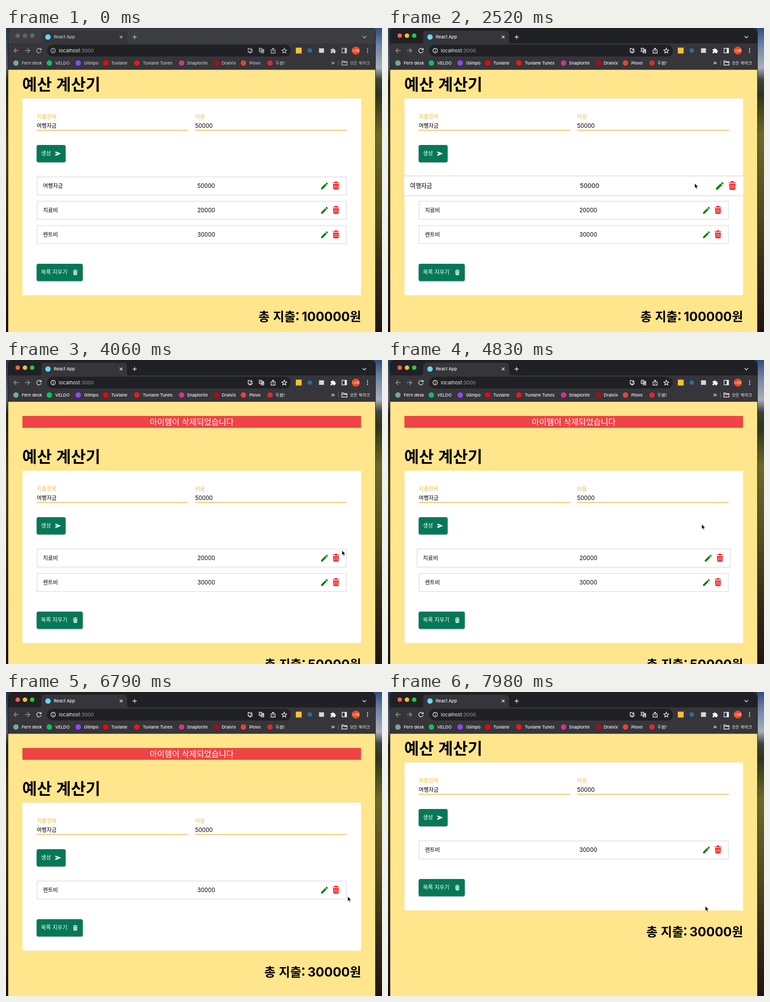
An HTML page for the animation above (8 s loop, 833 px wide and 673 px high).

```html
<!DOCTYPE html>
<html lang="ko">
<head>
<meta charset="utf-8">
<title>예산 계산기</title>
<style>
  html, body { margin: 0; width: 100%; height: 100%; overflow: hidden; }
  svg { display: block; width: 833px; height: 673px; }
  text { font: 12.5px Inter, "Noto Sans CJK KR", sans-serif; }
  .ko { font-family: "Noto Sans CJK KR", sans-serif; font-size: 12px; }
  .title { font-size: 35.5px; font-weight: 700; }
  .notice { font-size: 17.9px; fill: #fff; text-anchor: middle; }
  .total { font-size: 27px; font-weight: 700; text-anchor: end; }
  .total .sum { font: 700 28px Inter, sans-serif; }
  .label { fill: #efbf4d; }
  .on-green { fill: #fff; }
  .small { font-size: 9.5px; font-weight: 500; fill: currentColor; }
  .icon { fill: none; stroke: currentColor; stroke-width: 1.3; }
  #browser { --frame: #202124; color: #f4f4f6; }
  #browser.inactive { --frame: #3c3e42; color: #c3c5c9; }
  .inactive .light { fill: #636569; }
  .button { fill: #047857; filter: drop-shadow(0 1px 1px #0007); }
</style>
</head>
<body>
<svg viewBox="0 0 833 673">
  <defs>
    <linearGradient id="leftView" x2="0" y2="1">
      <stop offset="0" stop-color="#263955"/><stop offset=".13" stop-color="#59636c"/>
      <stop offset=".18" stop-color="#1c2413"/><stop offset=".4" stop-color="#4b4318"/>
      <stop offset=".7" stop-color="#302812"/><stop offset="1" stop-color="#17110b"/>
    </linearGradient>
    <linearGradient id="rightView" x2="0" y2="1">
      <stop offset="0" stop-color="#304d7c"/><stop offset=".06" stop-color="#7186a5"/>
      <stop offset=".13" stop-color="#a9b0b8"/><stop offset=".17" stop-color="#39443b"/>
      <stop offset=".22" stop-color="#2c341a"/><stop offset=".35" stop-color="#6c682a"/>
      <stop offset=".6" stop-color="#514b1d"/><stop offset=".8" stop-color="#332b14"/>
      <stop offset="1" stop-color="#1e160e"/>
    </linearGradient>
    <path id="pencil" transform="translate(695.5 339.5) scale(.84)" d="M3 17.25V21h3.75L17.81 9.94l-3.75-3.75zM20.71 7.04c.39-.39.39-1.02 0-1.41l-2.34-2.34c-.39-.39-1.02-.39-1.41 0l-1.83 1.83 3.75 3.75z"/>
    <g id="bin">
      <path d="M0 2.6Q0 2 .6 2H4.6L5.5.4Q5.8 0 6.3 0H9.7Q10.2 0 10.5.4L11.4 2H15.4Q16 2 16 2.6V4.2H0ZM1.3 5H14.7L14 16.8Q13.9 18.4 12.4 18.4H3.6Q2.1 18.4 2 16.8Z"/>
      <path class="slots" d="M4.9 7V16M8 7V16M11.1 7V16" stroke-width="1.1"/>
    </g>
  </defs>

  <rect width="420" height="673" fill="url(#leftView)"/>
  <rect x="420" width="413" height="673" fill="url(#rightView)"/>
  <rect x="5" y="60" width="813" height="613" fill="#ffe58b"/>

  <g id="page">
    <g id="notice">
      <rect x="37" y="124.5" width="749" height="25" fill="#f04346" stroke="#dd3c3d"/>
      <text class="ko notice" x="411.5" y="143.5">아이템이 삭제되었습니다</text>
    </g>
    <g id="content">
      <text class="ko title" x="36" y="138">예산 계산기</text>
      <rect id="card" x="36.5" y="156" width="750" fill="#fff"/>
      <text class="ko label" x="68" y="201">지출항목</text>
      <text class="ko" x="68" y="220.5">여행자금</text>
      <text class="ko label" x="419" y="201">비용</text>
      <text x="419" y="220.8">50000</text>
      <path d="M68 226.4H404M419 226.4H755" stroke="#edbd50" stroke-width="1.6"/>
      <rect class="button" x="68" y="259" width="64" height="38" rx="4"/>
      <text class="ko on-green" x="77.5" y="282">생성</text>
      <path d="M109.5 273 122 278 109.5 283.2V279.2L116 278 109.5 276.8Z" fill="#fff"/>
      <g id="rows"></g>
      <g id="footer">
        <rect class="button" x="68" y="522" width="102" height="38" rx="4"/>
        <text class="ko on-green" x="77.5" y="545">목록 지우기</text>
        <use href="#bin" transform="translate(148 534.5) scale(.69)" fill="#fff" stroke="#047857"/>
        <text class="ko total" x="786.5" y="649">총 지출:<tspan class="sum" dx="5" id="sum"></tspan>원</text>
      </g>
    </g>
  </g>

  <g id="browser">
    <path d="M5 40V10Q5 1 14 1H809Q818 1 818 10V40Z" fill="var(--frame)"/>
    <path d="M5 34H72Q78 34 78 28V14Q78 6 86 6H260Q268 6 268 14V28Q268 34 274 34H818V92.5H5Z" fill="#36353a"/>
    <path d="M4.5 673V10Q4.5 .5 14 .5H809Q818.5 .5 818.5 10V673" fill="none" stroke="#1b1b1d"/>
    <circle class="light" cx="26" cy="17" r="5" fill="#ff5f57"/>
    <circle class="light" cx="42" cy="17" r="5" fill="#febc2e"/>
    <circle class="light" cx="58" cy="17" r="5" fill="#28c840"/>
    <circle cx="93" cy="20" r="6" fill="#61dafb"/>
    <text class="small" x="106" y="23.4">React App</text>
    <path class="icon" d="M252 17l6 6m0-6-6 6M280.5 20h9m-4.5-4.5v9M790 18l4 4 4-4"/>
    <rect x="91" y="37" width="540" height="26" rx="13" fill="#202124"/>
    <g class="icon">
      <path d="M28 50H17.5m5-5-5 5 5 5M42 50H52.5m-5-5 5 5-5 5" stroke="#9a9ba0"/>
      <path d="M77 47A5 5 0 1 0 78 51M78 44.5v3.8h-3.8"/>
      <circle cx="104.5" cy="50" r="5"/>
      <path d="M104.5 49.3v3.4M104.5 46.8v1.3"/>
      <path d="M541 45.5h-4.5v7.5h9v-3M538.5 55h5M543.5 44v5.5m-2.5-2.5 2.5 2.5 2.5-2.5"/>
      <path d="M561 45h5.5v7H561ZM567.5 47.5H571V55h-5.5l-1-2M562.5 48.5h2.5M567 53l1.7-4 1.7 4"/>
      <path d="M589.5 48.5h-2.3v7h9v-7H594M591.7 52.5V44.5m-2.5 2.5 2.5-2.5 2.5 2.5"/>
      <path d="M616.5 44.6 618 48.4l4 .3-3.1 2.6 1 4-3.4-2.2-3.4 2.2 1-4-3.1-2.6 4-.3Z"/>
      <path d="M744.5 45h10v10h-10Z"/>
    </g>
    <text x="117" y="53.7" fill="#f1f1f3" font-size="11" style="font-size:11px">localhost<tspan fill="#9a9ba0">:3000</tspan></text>
    <rect x="642" y="43.5" width="13" height="13" fill="#fbc02d"/>
    <circle cx="673" cy="50" r="5" fill="#2d6da6"/>
    <rect x="693.5" y="45" width="11" height="10" fill="#d8d6d6"/>
    <g fill="currentColor">
      <path d="M719 47h3.2a1.9 1.9 0 1 1 3.8 0h3v3a1.9 1.9 0 1 1 0 3.8V56h-3.2a1.8 1.8 0 0 0-3.6 0H719v-3a1.7 1.7 0 0 0 0-3.4Z"/>
      <path d="M750.5 45h4v10h-4Z"/>
      <circle cx="801" cy="46" r="1.2"/><circle cx="801" cy="50" r="1.2"/><circle cx="801" cy="54" r="1.2"/>
    </g>
    <circle cx="775" cy="50" r="9" fill="#e64a22"/>
    <text class="ko" x="775" y="52.8" fill="#fff" text-anchor="middle" style="font-size:8px">나래</text>
    <g id="bookmarks"></g>
    <path class="icon" d="M721.5 75l2.5 2.5-2.5 2.5M725 75l2.5 2.5-2.5 2.5M744 73h4l1.5 1.5h6V82H744ZM744 76.3h11.5"/>
    <path d="M736.5 71.5V83.5" stroke="#707176"/>
    <text class="small ko" x="762" y="80.5" style="font-size:9.1px">모든 북마크</text>
  </g>

  <g id="pointer">
    <circle id="ring" cy="1" r="15.6" fill="none" stroke="#000" stroke-width="2.3"/>
    <path d="M0 0V10.8L2.5 8.6 4.2 12.4 6.1 11.5 4.4 7.9H7.8Z" stroke="#fff" stroke-width=".8"/>
  </g>
</svg>

<script>
const LOOP = 8000, STEP = 70, HOVER_MS = 300, ROW_PITCH = 54, NOTICE_HEIGHT = 89;
const POINTER_SHOWN = 840, WINDOW_ACTIVE = 1470;
const NOTICE = [3640, 6930];
const CLICKS = [[1470, 1610], [3570, 3710]];

const items = [
  { name: "여행자금", cost: 50000, removed: 3640, hovers: [[2230, LOOP]] },
  { name: "치료비", cost: 20000, removed: 6020, hovers: [[4060, 4640], [5170, LOOP]] },
  { name: "렌트비", cost: 30000, removed: Infinity, hovers: [[6200, 6480]] }
];

// time, x, y of the pointer tip
const path = [
  [840, 560, 680], [1400, 622, 315], [1680, 622, 315], [1890, 624, 312], [1960, 624, 312],
  [2380, 668, 343], [2800, 712, 346], [3430, 764, 348], [3780, 764, 348],
  [4130, 742, 430], [4340, 716, 440], [4830, 695, 363.5], [4970, 698, 366],
  [5460, 756, 437], [5950, 767, 438], [6160, 767, 438], [6480, 765, 461],
  [6790, 757, 452.5], [7000, 754, 464], [7420, 712, 490], [7700, 688, 500],
  [7770, 688, 500], [7980, 703, 474]
];

const bookmarks = [
  [22, 35, "#74a99c", "Fern desk"], [96, 109, "#05c75a", "VELDO"],
  [160, 173, "#9146ff", "Glimpo"], [221, 233, "#f00", "Tuvlane"],
  [290, 303, "#f01818", "Tuvlane Tunes"], [389, 401, "#d8308d", "Snaplorim"],
  [467, 478, "#b20a12", "Dralvix"], [526, 539, "#ea4335", "Plovo"],
  [585, 597, "#db2b2d", "두봄!"]
];

const $ = id => document.getElementById(id);
const clamp = p => Math.min(1, Math.max(0, p));
const easeOut = p => 1 - (1 - clamp(p)) ** 2;
const smooth = p => p * p * (3 - 2 * p);
const within = (t, [from, to]) => t >= from && t < to;
const show = (node, on) => node.setAttribute("display", on ? "inline" : "none");
const place = (node, x, y) => node.setAttribute("transform", `translate(${x} ${y})`);

$("bookmarks").innerHTML = bookmarks.map(([cx, x, color, name]) =>
  `<circle cx="${cx}" cy="77.5" r="6" fill="${color}"/><text class="small" x="${x}" y="80.8">${name}</text>`).join("");

$("rows").innerHTML = items.map(({ name, cost }) => `<g>
  <rect x="69" y="329.5" width="685" height="40" fill="#fff" stroke="#dedede" stroke-width="1.5"/>
  <text class="ko" x="82" y="353.5">${name}</text>
  <text x="424" y="354">${cost}</text>
  <use href="#pencil" fill="#078307"/>
  <use href="#bin" transform="translate(723 339.5)" fill="#f00505" stroke="#fff"/>
</g>`).join("");
const rowNodes = [...$("rows").children];

function pointerAt(t) {
  const next = path.findIndex(([time]) => time > t);
  if (next < 0) return path.at(-1).slice(1);
  const [t0, x0, y0] = path[Math.max(0, next - 1)], [t1, x1, y1] = path[next];
  const p = smooth(clamp((t - t0) / (t1 - t0 || 1)));
  return [x0 + (x1 - x0) * p, y0 + (y1 - y0) * p];
}

function hoverScale(hovers, t) {
  return hovers.reduce((scale, [on, off]) =>
    scale + .1 * (easeOut((t - on) / HOVER_MS) - easeOut((t - off) / HOVER_MS)), 1);
}

function draw(t) {
  const noticeOn = within(t, NOTICE);
  show($("notice"), noticeOn);
  place($("content"), 0, noticeOn ? NOTICE_HEIGHT : 0);

  let count = 0, sum = 0;
  items.forEach(({ cost, removed, hovers }, i) => {
    const present = t < removed;
    show(rowNodes[i], present);
    if (!present) return;
    rowNodes[i].setAttribute("transform",
      `translate(411.5 ${349.5 + ROW_PITCH * count}) scale(${hoverScale(hovers, t)}) translate(-411.5 -349.5)`);
    count++;
    sum += cost;
  });
  const missing = (items.length - count) * ROW_PITCH;
  $("card").setAttribute("height", 435.5 - missing);
  place($("footer"), 0, -missing);
  $("sum").textContent = sum;

  $("browser").classList.toggle("inactive", t < WINDOW_ACTIVE);
  show($("pointer"), t >= POINTER_SHOWN);
  show($("ring"), CLICKS.some(click => within(t, click)));
  place($("pointer"), ...pointerAt(t));
}

function tick() {
  const t = performance.now() % LOOP;
  draw(Math.floor(t / STEP) * STEP);
  requestAnimationFrame(tick);
}
tick();
</script>
</body>
</html>
```
